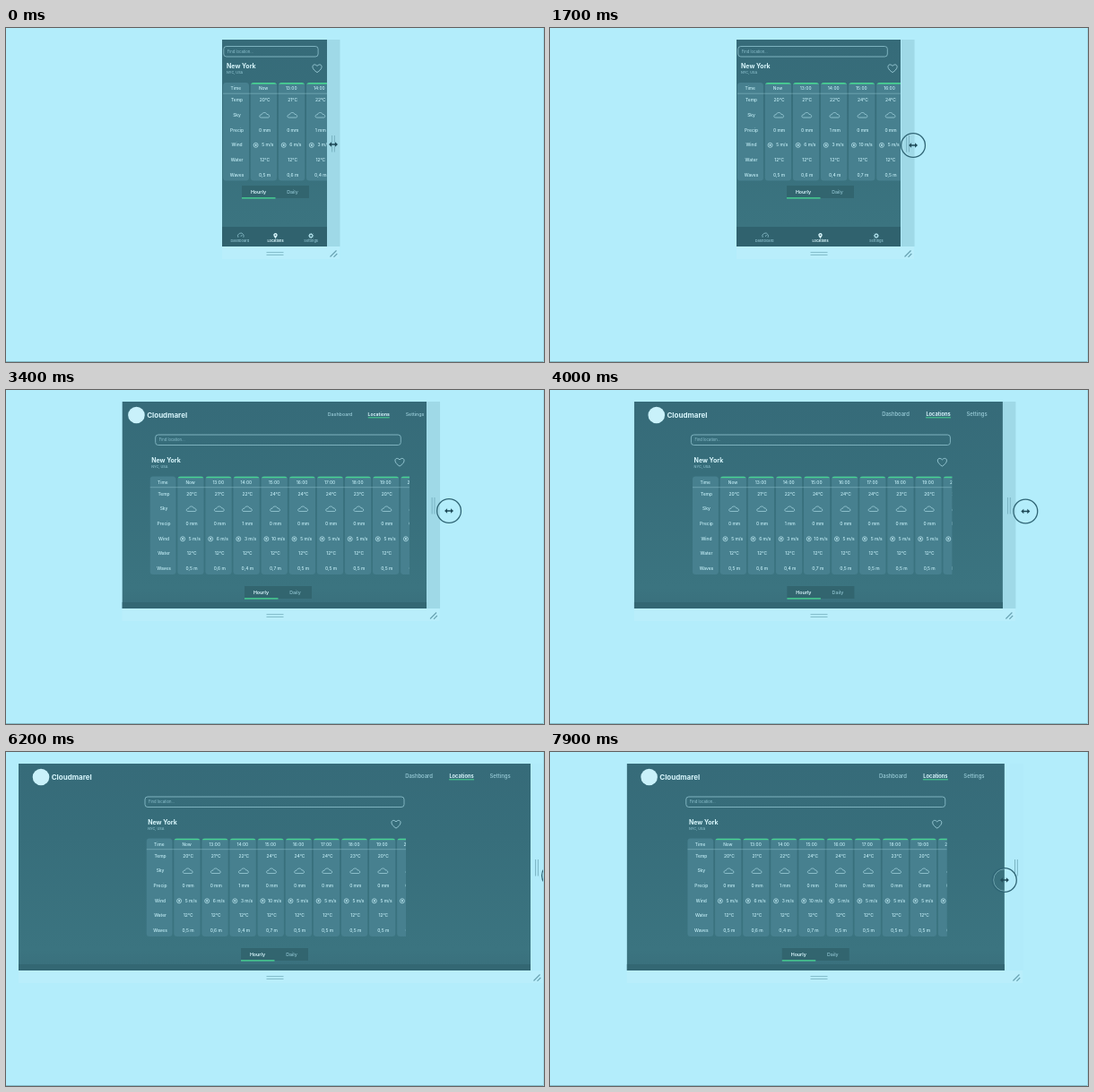
Recreate the animation shown at these times as an HTML page with a canvas. Size 600 by 373 pixels, loop 8000 ms.

```html
<!DOCTYPE html>
<html lang="en">
<head>
<meta charset="utf-8">
<title>Responsive weather panel</title>
<style>
html, body { margin: 0; width: 100%; height: 100%; overflow: hidden; background: #b3edfb; }
canvas { display: block; width: 600px; height: 373px; }
</style>
</head>
<body>
<canvas id="stage"></canvas>
<script>
const LOOP = 8000, TOP = 13, BOTTOM = 244;
const BG = '#b3edfb', INK = '#2f6575', TEXT = '#c4eef7', DIM = '#8fc3d0', GREEN = '#48d392';
const FONT = 'Inter, "Open Sans", sans-serif';

const canvas = document.getElementById('stage');
const ctx = canvas.getContext('2d');
const ratio = window.devicePixelRatio || 1;
canvas.width = 600 * ratio;
canvas.height = 373 * ratio;

// time, panel left, panel right, layout width, handle x, pointer x, pointer y
const KEYS = [
  [0, 241, 358, 119, 365, 365, 130],
  [900, 233, 367, 136, 374, 378, 130.5],
  [1700, 208, 391, 187, 399, 405, 131],
  [2500, 181, 418, 237, 429, 444, 133],
  [3400, 129.5, 469, 348, 476.5, 494, 135],
  [4700, 58, 541, 483, 548, 567, 136],
  [6200, 14, 585, 571, 592, 611, 138],
  [6600, 13, 586, 573, 593, 611, 139],
  [7300, 40, 556, 516, 564, 560, 141],
  [7900, 85.5, 507, 421.5, 520, 507, 143],
  [8000, 95, 499, 404, 512, 494, 143.5]
];
const TEMPS = [20, 21, 22, 24, 24, 24, 23, 20, 20];
const RAIN = [0, 0, 1, 0, 0, 0, 0, 0, 0];
const WIND = [5, 6, 3, 10, 5, 5, 5, 5, 5];
const WAVES = [5, 6, 4, 7, 5, 5, 5, 5, 5];
const ROWS = ['Temp', 'Sky', 'Precip', 'Wind', 'Water', 'Waves'];

const clamp = (v, a = 0, b = 1) => Math.min(b, Math.max(a, v));
const ramp = (t, a, b) => clamp((t - a) / (b - a));

function slope(i, k) {
  const a = KEYS[i], b = KEYS[i + 1];
  return (b[k] - a[k]) / (b[0] - a[0]);
}
function tangent(i, k) {
  if (i === 0) return 0;
  if (i === KEYS.length - 1) return slope(i - 1, k);
  const p = slope(i - 1, k), q = slope(i, k);
  return p * q <= 0 ? 0 : 2 * p * q / (p + q);
}
// Monotone cubic through the keys
function track(t, k) {
  let i = 0;
  while (i < KEYS.length - 2 && t >= KEYS[i + 1][0]) i++;
  const a = KEYS[i], b = KEYS[i + 1], d = b[0] - a[0];
  const u = (t - a[0]) / d, v = 1 - u;
  return a[k] * v * v * (1 + 2 * u) + b[k] * u * u * (3 - 2 * u)
    + d * u * v * (v * tangent(i, k) - u * tangent(i + 1, k));
}

function text(s, x, y, size, color = TEXT, weight = 500, align = 'center') {
  ctx.font = `${weight} ${size}px ${FONT}`;
  ctx.fillStyle = color;
  ctx.textAlign = align;
  ctx.textBaseline = 'middle';
  ctx.fillText(s, x, y);
}
function box(x, y, w, h, color) {
  ctx.fillStyle = color;
  ctx.fillRect(x, y, w, h);
}
function round(x, y, w, h, r) {
  ctx.beginPath();
  ctx.roundRect(x, y, w, h, r);
}
function disc(x, y, r, color) {
  ctx.beginPath();
  ctx.arc(x, y, r, 0, Math.PI * 2);
  ctx.fillStyle = color;
  ctx.fill();
}
function ring(x, y, r, color, width) {
  ctx.beginPath();
  ctx.arc(x, y, r, 0, Math.PI * 2);
  stroke(color, width);
}
function stroke(color, width) {
  ctx.strokeStyle = color;
  ctx.lineWidth = width;
  ctx.stroke();
}
function line(x1, y1, x2, y2, color, width) {
  ctx.beginPath();
  ctx.moveTo(x1, y1);
  ctx.lineTo(x2, y2);
  stroke(color, width);
}

function cloud(x, y) {
  ctx.beginPath();
  ctx.moveTo(x - 4, y + 2.6);
  ctx.bezierCurveTo(x - 6.5, y + 2.4, x - 5.8, y - 0.8, x - 3.2, y - 0.6);
  ctx.bezierCurveTo(x - 2.4, y - 3.6, x + 2, y - 3.6, x + 2.6, y - 1);
  ctx.bezierCurveTo(x + 5.4, y - 1.2, x + 6.2, y + 2.2, x + 4.2, y + 2.6);
  ctx.closePath();
  stroke('#a9d9e4', 0.7);
}
function heart(x, y) {
  ctx.beginPath();
  ctx.moveTo(x, y + 4.6);
  ctx.bezierCurveTo(x - 9, y - 1, x - 4, y - 7, x, y - 2.6);
  ctx.bezierCurveTo(x + 4, y - 7, x + 9, y - 1, x, y + 4.6);
  stroke('#a9d9e4', 0.8);
}
function search(x, y, w) {
  round(x, y, w, 11.5, 3);
  stroke('#86bac7', 0.9);
  text('Find location...', x + 4, y + 6, 4.2, DIM, 400, 'left');
}

function column(x, y, w, top) {
  round(x, y, w, 109.5, 3.5);
  ctx.fillStyle = '#47808f';
  ctx.fill();
  if (!top) return;
  ctx.save();
  ctx.clip();
  box(x, y, w, 1.7, GREEN);
  ctx.restore();
}

function table(x, y, right, first) {
  ctx.save();
  ctx.beginPath();
  ctx.rect(x, y - 1, right - x, 112);
  ctx.clip();
  column(x, y, first - 0.5, false);
  const mid = x + first / 2 - 0.5;
  const rowY = i => y + 19.7 + i * 16.7;
  text('Time', mid, y + 6.7, 4.8);
  ROWS.forEach((name, i) => text(name, mid + 1.3, rowY(i), 4.9));
  for (let i = 0; i < 9; i++) {
    const left = x + first + 1.3 + i * 31.1, c = left + 14.3, v = c + 1.5;
    if (left > right) break;
    column(left, y, 29.3, true);
    text(i ? `${12 + i}:00` : 'Now', c, y + 6.7, 4.8);
    text(`${TEMPS[i]}°C`, v, rowY(0), 4.9);
    cloud(v - 0.3, rowY(1));
    text(`${RAIN[i]} mm`, v, rowY(2), 4.9);
    ring(c - 8.5, rowY(3), 2.5, TEXT, 0.7);
    disc(c - 8.5, rowY(3), 1, TEXT);
    text(`${WIND[i]} m/s`, c + 4.7, rowY(3), 4.9);
    text('12°C', v, rowY(4), 4.9);
    text(`0,${WAVES[i]} m`, v, rowY(5), 4.9);
  }
  line(x, y + 12.2, right, y + 12.2, 'rgba(165,215,226,.55)', 0.7);
  ctx.restore();
}

function place(x, y, heartX) {
  text('New York', x, y, 7, '#d8f6fc', 700, 'left');
  text('NYC, USA', x, y + 7.3, 3.8, DIM, 500, 'left');
  heart(heartX, y + 2);
}

function tabs(c, y) {
  box(c - 37.5, y, 75, 14, '#32656f');
  box(c - 37.5, y + 13.2, 37.5, 1.4, GREEN);
  text('Hourly', c - 19, y + 7, 5.3, '#d8f6fc', 600);
  text('Daily', c + 19, y + 7, 5.3, DIM);
}

function bottomNav(left, width) {
  const [a, b, c] = [1, 3, 5].map(n => left + width * n / 6);
  box(left, 222, width, 22, '#30626e');
  ctx.beginPath();
  ctx.arc(a + 1, 232.3, 3.3, Math.PI * 0.85, Math.PI * 2.15);
  stroke(DIM, 0.8);
  line(a + 1, 233, a + 2.4, 231, DIM, 0.8);
  ctx.beginPath();
  ctx.arc(b, 231.2, 2.2, Math.PI * 0.85, Math.PI * 2.15);
  ctx.lineTo(b, 235.3);
  ctx.closePath();
  ctx.fillStyle = '#d8f6fc';
  ctx.fill();
  disc(b, 231.2, 0.8, '#30626e');
  for (let i = 0; i < 4; i++) {
    const dx = Math.cos(i * Math.PI / 4) * 3, dy = Math.sin(i * Math.PI / 4) * 3;
    line(c - dx, 232 - dy, c + dx, 232 + dy, '#a9d9e4', 1);
  }
  disc(c, 232, 2.3, '#a9d9e4');
  disc(c, 232, 1.1, '#30626e');
  text('Dashboard', a, 238, 4, DIM);
  text('Locations', b, 238, 3.8, '#d8f6fc', 700);
  text('Settings', c, 238, 4, DIM);
}

function topNav(left, width) {
  const wide = width > 385, end = left + width;
  const [a, b, c] = wide ? [124.5, 77, 34] : [105, 61.8, 21.5];
  const size = wide ? 5.9 : 5.3;
  const logo = left + (wide ? 25 : 16);
  disc(logo, 28, 9.3, '#c9f1fa');
  text('Cloudmarel', logo + 11.7, 28.5, 8, '#d8f6fc', 700, 'left');
  text('Dashboard', end - a, 27.2, size, '#9bcdd9');
  text('Locations', end - b, 27.2, size - 0.2, '#d8f6fc', 700);
  text('Settings', end - c, 27.2, size, '#9bcdd9');
  const half = wide ? 14 : 12;
  box(end - b - half, 30.3, half * 2, 1, GREEN);
}

function panel(left, right, width) {
  const c = left + width / 2;
  ctx.save();
  ctx.beginPath();
  ctx.rect(left, TOP, right - left, BOTTOM - TOP);
  ctx.clip();
  const fill = ctx.createLinearGradient(0, TOP, 0, BOTTOM);
  fill.addColorStop(0, '#366b79');
  fill.addColorStop(0.35, '#376e7b');
  fill.addColorStop(0.9, '#3b7480');
  fill.addColorStop(1, '#396f7c');
  box(left, TOP, right - left, BOTTOM - TOP, fill);
  if (width < 205) {
    search(left + 1.8, 20.5, width * 0.9 - 1.8);
    place(left + 5, 43, left + width - 13);
    table(left + 1, 61, right, 29.5);
    tabs(c, 176);
    bottomNav(left, width);
  } else {
    const tight = width < 292;
    const x = Math.max(left + 3, c - 143);
    const field = Math.min(289, width * 0.786);
    topNav(left, width);
    search(c - field / 2, 50, field);
    place(x + 1.7, 78.5, Math.min(left + width - 11, c + 135.5));
    table(x, 96.5, Math.min(right, c + 146.5), tight ? 24.5 : 29.5);
    tabs(c, 219);
    box(left, 237, width, 7, '#336773');
  }
  ctx.restore();
}

function handles(t, left, right, x) {
  const grip = '#79b3c2';
  box(left, BOTTOM, x + 7 - left, 14, 'rgba(255,255,255,.08)');
  ctx.globalAlpha = 1 - 0.9 * ramp(t, 5000, 6200);
  box(x - 7.3, TOP, 14.8, BOTTOM - TOP, '#9fd9e7');
  ctx.globalAlpha = 1;
  for (const d of [-1.4, 1.4]) {
    line(x + d, 120, x + d, 138.5, grip, 1);
    line(290.5, 252 + d, 309.5, 252 + d, '#7fbac8', 1);
  }
  line(x - 3.5, 255.5, x + 3.5, 248.5, '#66a0b0', 1.1);
  line(x + 0.5, 255.8, x + 4.3, 252, '#66a0b0', 1.1);
}

function pointer(t, x, y) {
  const show = ramp(t, 150, 500);
  if (show > 0) {
    const r = 13.4 * (0.6 + 0.4 * show);
    ctx.globalAlpha = show;
    ring(x, y, r - 1.1, 'rgba(190,238,249,.55)', 0.8);
    ring(x, y, r, INK, 1.3);
    ctx.globalAlpha = 1;
  }
  const dark = '#1e4a58';
  line(x - 3, y, x + 3, y, dark, 1.5);
  for (const s of [-1, 1]) {
    ctx.beginPath();
    ctx.moveTo(x + s * 5, y);
    ctx.lineTo(x + s * 2, y - 2.8);
    ctx.lineTo(x + s * 2, y + 2.8);
    ctx.closePath();
    ctx.fillStyle = dark;
    ctx.fill();
  }
}

function draw(t) {
  const [left, right, width, grip, px, py] = [1, 2, 3, 4, 5, 6].map(k => track(t, k));
  ctx.setTransform(ratio, 0, 0, ratio, 0, 0);
  box(0, 0, 600, 373, BG);
  handles(t, left, right, grip);
  panel(left, right, width);
  pointer(t, px, py);
  box(0, 372, 600, 1, '#86bfcc');
  box(599, 0, 1, 373, '#a0d9e7');
}

const start = performance.now();
function frame() {
  draw((performance.now() - start) % LOOP);
  requestAnimationFrame(frame);
}
frame();
</script>
</body>
</html>
```
